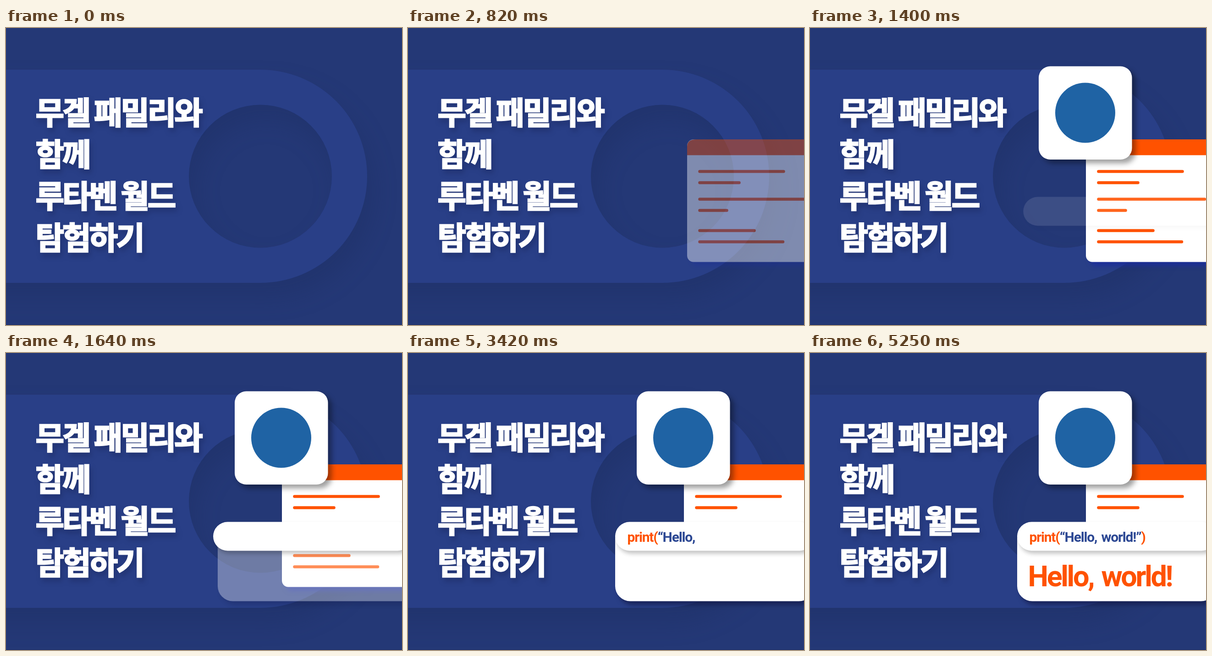
An HTML page that plays this animation: 864 by 648 pixels, repeating every 6.85 s.

```html
<!DOCTYPE html>
<html lang="ko">
<head>
<meta charset="utf-8">
<title>월드 탐험하기</title>
<style>
  html, body { margin: 0; width: 100%; height: 100%; overflow: hidden; background: #243876; }
  svg { display: block; width: 864px; height: 648px; }

  .track { fill: #293f87; filter: drop-shadow(14px 32px 24px rgba(28, 42, 92, .3)); }
  .title {
    font: 900 68px "Noto Sans CJK KR", "Noto Sans KR", sans-serif;
    letter-spacing: -4px; word-spacing: -5px;
    fill: #fff; stroke: #fff; stroke-width: 2.6px;
    filter: drop-shadow(4px 8px 6px rgba(22, 34, 84, .42));
  }
  .code, .result { font-family: Roboto, Inter, sans-serif; white-space: pre; }
  .code { font-size: 30px; font-weight: 600; letter-spacing: -1.2px; word-spacing: 3px; }
  .result { font-size: 63px; font-weight: 700; letter-spacing: -3.4px; word-spacing: 5px; fill: #ff5200; }
  .key { fill: #ff5200; }
  .str { fill: #2b4793; }

  .window { filter: drop-shadow(8px 9px 5px rgba(26, 44, 156, .8)); }
  .rules { stroke: #ff5200; stroke-width: 6.5px; stroke-linecap: round; }
  .card { filter: drop-shadow(8px 8px 6px rgba(0, 0, 0, .38)); }
  .panel { filter: drop-shadow(6px 8px 5px rgba(18, 26, 72, .7)); }
  .bar { filter: drop-shadow(4px 6px 5px rgba(0, 0, 0, .24)); }

  .in { animation: 6850ms linear infinite; }
  .in.window-in { --d: 12px; animation-name: window-in; }
  .in.card-in { --d: 14.6px; animation-name: card-in; }
  .in.bar-in { --d: 15px; animation-name: bar-in; }
  .in.panel-in { --d: 15px; animation-name: panel-in; }
  .in.result-in { --d: 15px; animation-name: result-in; }

  @keyframes window-in {
    0% { opacity: 0; transform: translateX(var(--d)); }
    9.752% { opacity: 0; transform: translateX(var(--d)); animation-timing-function: steps(12); }
    15.007%, 100% { opacity: 1; transform: none; }
  }
  @keyframes card-in {
    0% { opacity: 0; transform: translateX(var(--d)); }
    14.715% { opacity: 0; transform: translateX(var(--d)); animation-timing-function: steps(12); }
    19.971%, 100% { opacity: 1; transform: none; }
  }
  @keyframes bar-in {
    0%, 20% { opacity: 0; transform: translateX(var(--d)); }
    23.942%, 100% { opacity: 1; transform: none; }
  }
  @keyframes panel-in {
    0%, 22.817% { opacity: 0; transform: translateX(var(--d)); }
    26.131%, 100% { opacity: 1; transform: none; }
  }
  @keyframes result-in {
    0% { opacity: 0; transform: translateX(var(--d)); }
    71.358% { opacity: 0; transform: translateX(var(--d)); animation-timing-function: steps(12); }
    76.613%, 100% { opacity: 1; transform: none; }
  }
</style>
</head>
<body>
<svg viewBox="0 0 864 648">
  <rect width="864" height="648" fill="#243876"/>
  <path class="track" fill-rule="evenodd"
    d="M-90 91H555.5a232.5 232.5 0 0 1 0 465H-90ZM399 323.5a156 156 0 0 0 312 0a156 156 0 0 0 -312 0Z"/>
  <rect y="647" width="864" height="1" fill="#1d2d62"/>

  <g class="title">
    <text x="64.5" y="210">무겔 패밀리와</text>
    <text x="64.5" y="301">함께</text>
    <text x="64.5" y="392">루타벤 월드</text>
    <text x="64.5" y="483">탐험하기</text>
  </g>

  <g class="in window-in">
    <g class="window">
      <rect x="602" y="243" width="300" height="267.5" rx="14" fill="#fff"/>
      <path d="M602 277.5V259Q602 243 622 243H902V277.5Z" fill="#ff5200"/>
    </g>
    <path class="rules" d="M629.5 313H812.5M629.5 337.5H715.5M629.5 373.5H861M629.5 398H688.5M629.5 442H748.5M629.5 466.5H811"/>
  </g>

  <g class="in card-in">
    <rect class="card" x="499" y="83.5" width="203.5" height="203.5" rx="25" fill="#fff"/>
    <circle cx="600.5" cy="185" r="65.5" fill="#1f63a4"/>
  </g>

  <g class="in panel-in">
    <rect class="panel" x="452" y="372" width="434" height="169.5" rx="33" fill="#fff"/>
  </g>
  <g class="in result-in"><text class="result" x="475.5" y="509">Hello, world!</text></g>

  <g class="in bar-in">
    <rect class="bar" x="452" y="368.5" width="434" height="63" rx="31.5" fill="#fff"/>
  </g>
  <text class="code" x="478.5" y="412"></text>
</svg>
<script>
  const LOOP = 6850, START = 2220, STEP = 100;
  const line = document.querySelector('.code');
  let count = 0;

  function addChar(char, kind) {
    const span = document.createElementNS(line.namespaceURI, 'tspan');
    span.textContent = char;
    span.setAttribute('class', kind);
    line.append(span);
    if (char === ' ') return;
    const at = (START + STEP * count++ - 2) / LOOP;
    span.animate([
      { fillOpacity: 0, offset: 0 },
      { fillOpacity: 0, offset: at },
      { fillOpacity: 1, offset: at },
      { fillOpacity: 1, offset: 1 }
    ], { duration: LOOP, iterations: Infinity });
  }

  for (const [text, kind] of [['print(', 'key'], ['“Hello, world!”', 'str'], [')', 'key']])
    for (const char of text) addChar(char, kind);
</script>
</body>
</html>
```
